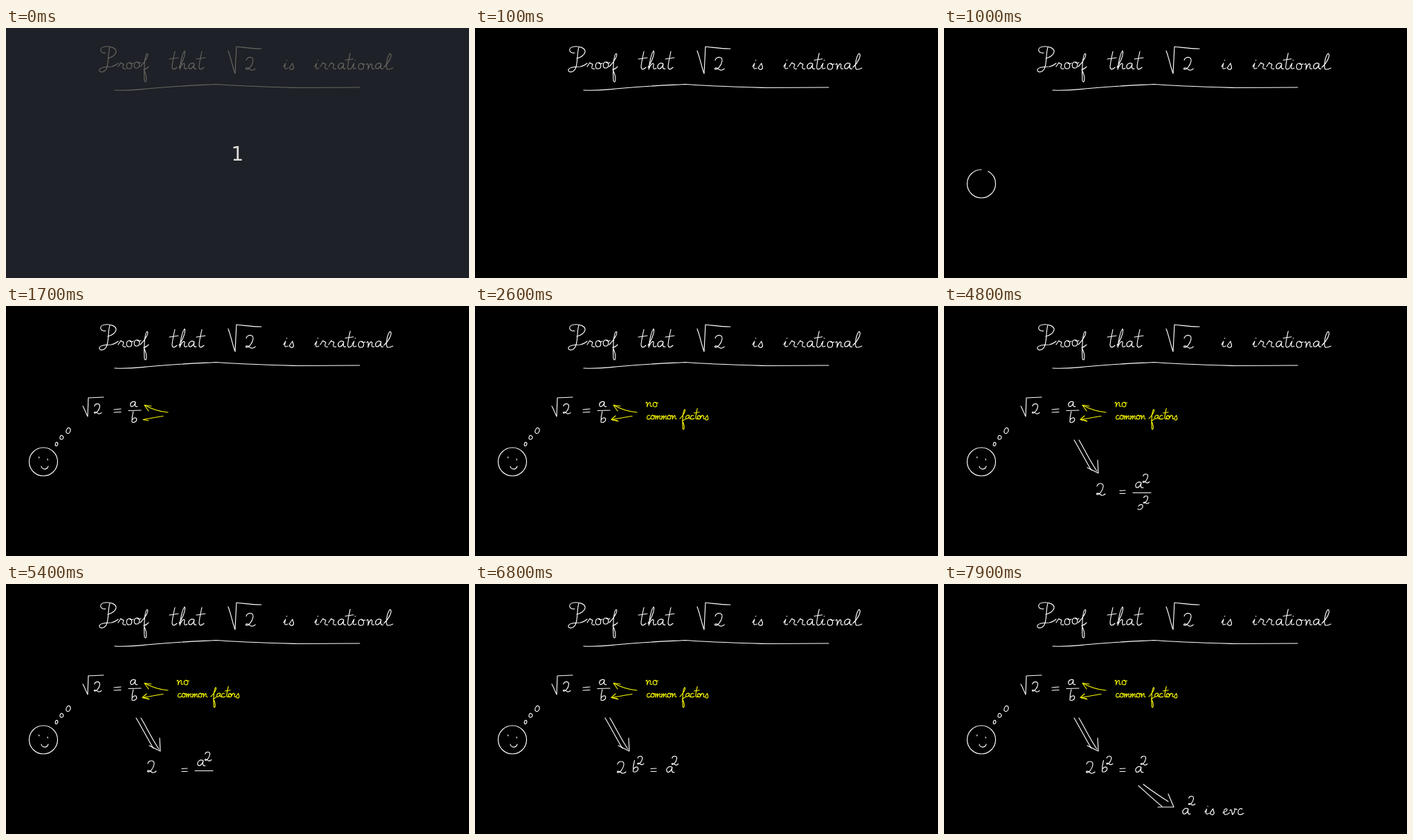
An HTML page that plays this animation: 669 by 362 pixels, repeating every 8 s.

```html
<!DOCTYPE html>
<html lang="en">
<head>
<meta charset="utf-8">
<title>Handwritten proof</title>
<style>
  html, body { margin: 0; width: 100%; height: 100%; overflow: hidden; background: #000; }
  svg { display: block; width: 100%; height: 100%; background: #000; --white: #fff; }
  svg.waiting { background: #1e2127; --white: #68675f; }
  path { fill: none; stroke: var(--white); stroke-linecap: round; stroke-linejoin: round; }
  path.yellow { stroke: #f8f800; }
  text { display: none; fill: #deded9; font: 28px "DejaVu Sans", sans-serif; text-anchor: middle; }
  .waiting text { display: block; }
</style>
</head>
<body>
<svg viewBox="0 0 669 362"><text x="334.5" y="192">1</text></svg>
<script>
const LOOP = 8000, STEP = 100;
const svg = document.querySelector('svg');
const groups = [];

// Pen strokes of each letter, baseline at y = 0.
const glyphs = {
  P: 'M9 -24 C0 -23 -1 -32 8 -33 C16 -34 25 -31 24 -25 C22 -19 16 -17 12 -16 M15 -32 C12 -23 14 -9 10 -1 C7 5 -1 5 0 0 C2 -4 12 -4 17 -4 C21 -5 25 -7 27 -9',
  a: 'M9 -8 C5 -11 0 -7 1 -3 C2 1 7 -1 9 -8 C8 -3 8 0 12 -1',
  b: 'M3 -17 C1 -10 1 -4 1 -1 C4 1 9 -2 8 -6 C7 -9 3 -7 2 -5',
  c: 'M7 -8 C3 -11 0 -5 1 -2 C2 1 6 0 9 -2',
  e: 'M0 -3 C6 -4 8 -9 5 -9 C1 -9 0 0 4 0 C6 0 8 -1 10 -3',
  f: 'M0 -4 C8 -12 13 -22 10 -23 C6 -22 5 4 6 16 C8 22 12 14 5 0 C7 0 10 -2 12 -4',
  h: 'M0 -3 C6 -12 10 -24 8 -27 C4 -22 2 -8 1 0 C4 -9 9 -11 8 -6 C7 -2 8 1 12 -2',
  i: 'M0 -4 L3 -9 C1 -3 1 1 6 -2 M4.4 -13.5 L4.8 -13.2',
  l: 'M0 -3 C8 -10 13 -22 9 -23 C5 -20 1 0 6 0 C9 0 11 -1 13 -2',
  m: 'M0 -7 C2 -9 2 -5 1 0 C3 -7 6 -10 6 -6 L5 0 C8 -8 11 -10 11 -6 C10 -2 10 1 14 -1',
  n: 'M0 -7 C2 -10 3 -8 2 0 C4 -7 7 -10 8 -7 C8 -4 6 0 11 -1',
  o: 'M4 -9 C-1 -8 -1 0 4 0 C9 0 9 -9 4 -9 C6 -6 8 -7 10 -8',
  r: 'M0 -4 L4 -10 C5 -7 8 -9 8 -7 C6 -3 6 0 11 -1',
  s: 'M0 -2 L5 -9 C5 -6 8 -3 6 -1 C4 1 1 0 1 -2',
  t: 'M7 -26 C5 -17 3 -8 3 -3 C4 1 7 0 10 -3 M-1 -15 L12 -17',
  v: 'M0 -6 C3 -11 3 -2 4 0 C8 -4 8 -8 7 -9 L11 -8',
  2: 'M1 -13 C2 -18 11 -19 10 -12 C9 -6 4 0 1 -1 C-1 -3 3 -4 6 -1 C8 1 11 0 13 -2'
};

const node = (name, parent) =>
  parent.appendChild(document.createElementNS('http://www.w3.org/2000/svg', name));

// Each item is a path in stage units or [letter, x, baseline, scale].
function ink(start, end, items, { color = '', erase = null, moves = null } = {}) {
  const layer = node('g', svg), strokes = [];
  let total = 0;
  for (const item of items) {
    const [d, x, y, k = 1] = typeof item === 'string' ? [item, 0, 0] : [glyphs[item[0]], ...item.slice(1)];
    for (const part of d.split(/(?=M)/)) {
      const path = node('path', layer);
      path.setAttribute('d', part);
      path.setAttribute('transform', `translate(${x} ${y}) scale(${k})`);
      path.setAttribute('stroke-width', 1.15 / k);
      path.setAttribute('class', color);
      const length = path.getTotalLength() * k;
      path.setAttribute('pathLength', 1);
      strokes.push({ path, from: total, length });
      total += length;
    }
  }
  groups.push({ layer, strokes, total, start, end, erase, moves });
}

const clamp = v => Math.max(0, Math.min(1, v));
const progress = (t, start, end) => clamp((t - start + STEP) / (end - start + STEP));

function offset(moves, t) {
  let x = 0, y = 0;
  for (const [start, end, dx, dy] of moves) {
    const p = progress(t, start, end);
    x += dx * p;
    y += dy * p;
  }
  return `translate(${x} ${y})`;
}

function draw(t) {
  svg.classList.toggle('waiting', t < STEP);
  for (const g of groups) {
    const drawn = g.total * progress(t, g.start, g.end);
    const gone = g.erase ? g.total * progress(t, ...g.erase) : 0;
    for (const { path, from, length } of g.strokes) {
      const head = clamp((drawn - from) / length), tail = clamp((gone - from) / length);
      path.style.display = head > tail ? '' : 'none';
      path.style.strokeDasharray = head - tail < 1 ? `${head - tail} 2` : 'none';
      path.style.strokeDashoffset = -tail;
    }
    if (g.moves) g.layer.setAttribute('transform', offset(g.moves, t));
  }
}

// Title
ink(-STEP, -STEP, [
  ['P', 135, 60], ['r', 162, 60], ['o', 174, 59], ['o', 185, 58], ['f', 194, 60],
  ['t', 237, 60], ['h', 250, 60], ['a', 263, 60], ['t', 276, 60],
  'M321 33 C325 43 327 55 331 66 L333 27 C344 28 355 30 369 30', ['2', 346, 61, 1.1],
  ['i', 401, 60], ['s', 409, 60],
  ['i', 446, 60], ['r', 454, 60], ['r', 466, 60], ['a', 479, 60], ['t', 491, 60, .9],
  ['i', 500, 60], ['o', 509, 60], ['n', 521, 60], ['a', 533, 60], ['l', 546, 60],
  'M157 90 C180 91 180 90 215 87 C248 84 275 83 303 81.5 C335 84 370 85 420 86.5 L511 86'
]);

// Thinker and first equation
ink(800, 1600, [
  'M54 205 A20.5 20.5 0 0 0 54 246 A20.5 20.5 0 0 0 54 205',
  'M47.5 218.5 L48 220 M60 221.5 L60.4 223', 'M51 232 C52 237 59 238 61 232',
  'M72 198 C69 204 75 204 75 199 C74 197 73 197 72 198',
  'M79 188 C75 194 83 195 83 190 C82 187 80 187 79 188',
  'M89 177 C84 183 89 187 92 183 C95 178 91 175 89 177',
  'M111 145 C113 148 115 154 118 160 L119 133 L141 132', ['2', 127, 156, .85],
  'M156 150 L166 149 M156 154 L166 153.5', ['a', 179, 146.5, .9]
]);
ink(1700, 1700, ['M177 151.5 L195 151', ['b', 181, 169, .95]]);

// Remark
const yellow = { color: 'yellow' };
ink(1700, 1700, [
  'M234 154 C221 153 212 150 201 144 M210 145 L200 143.5 L206 152',
  'M227 159.5 C216 161 206 163 198 164.5 L206 166'
], yellow);
ink(1800, 1800, ['M203 159 L197 164.5 L207 167'], yellow);
ink(1800, 2500, [
  ['n', 247, 146, .8], ['o', 257, 146, .75],
  ['c', 248, 164, .65], ['o', 254, 164, .65], ['m', 260, 164, .65], ['m', 269, 164, .65],
  ['o', 278, 164, .65], ['n', 284, 164, .65],
  ['f', 296, 166, .7], ['a', 304, 164, .65], ['c', 311, 164, .65], ['t', 317, 164, .6],
  ['o', 321, 164, .6]
], yellow);
ink(2600, 2600, [['r', 326, 164, .6], ['s', 332, 165, .75]], yellow);

// Squared equation, then rearranged
ink(3400, 3500, [
  'M188 194 C197 209 205 225 213 238', 'M195 194 C204 209 211 225 221 239',
  'M207 234 L223 242 L222 223'
]);
ink(3600, 3700, [['2', 220, 274]], { moves: [[5200, 5400, -16, -1], [5500, 5600, 1, 1]] });
ink(3700, 3700, ['M254 267.5 L262 267 M254 271.5 L262 271.5']);
ink(3800, 3800, [['a', 276, 264]], { moves: [[6000, 6200, 0, 9.5]] });
ink(3800, 4000, [['2', 287, 256, .75]], { moves: [[6000, 6200, -3, 6]] });
ink(4000, 4000, ['M273 270.5 L299 270.5'], { erase: [5700, 5800] });
ink(4100, 4100, [['b', 279, 295], ['2', 288, 286, .65]], { erase: [4800, 5100] });
ink(6200, 6400, [['b', 227, 272], ['2', 234, 261, .72]], { moves: [[6800, 6800, .5, .5]] });

// Conclusion
ink(7200, 7900, [
  'M281 292 C292 302 304 313 315 322', 'M288 290 C299 299 312 307 324 315',
  'M309 323 L332 323 L324 304',
  ['a', 344, 334], ['2', 353, 320, .75], ['i', 377, 334, .9], ['s', 384, 334, .95],
  ['e', 403, 334, .95], ['v', 413, 334, .95], ['c', 424, 334]
]);

function tick() {
  const t = performance.now() % LOOP;
  draw(Math.floor(t / STEP) * STEP);
  requestAnimationFrame(tick);
}
tick();
</script>
</body>
</html>
```
